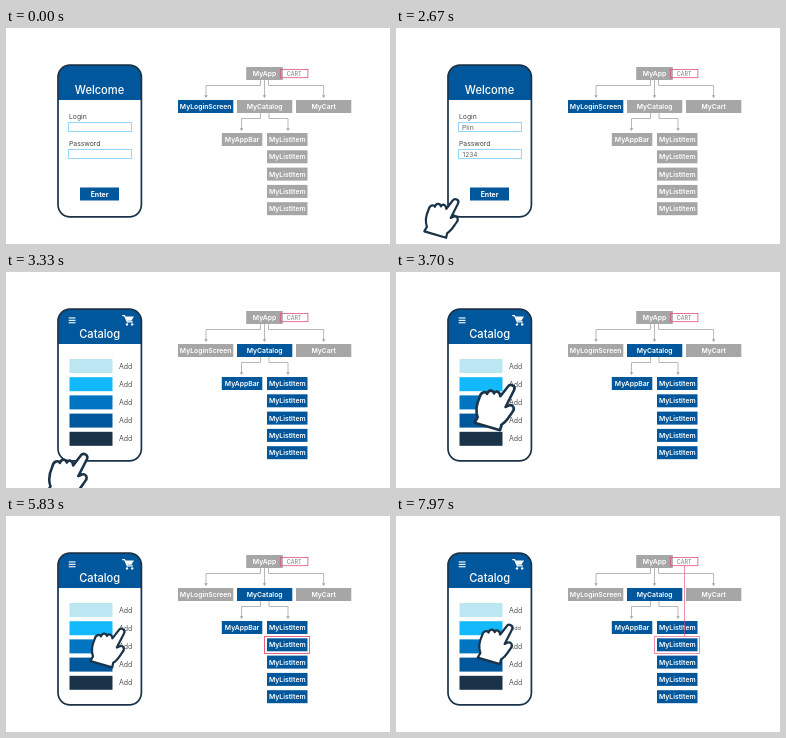
Recreate the animation shown at these times as an HTML page with a canvas. Size 384 by 216 pixels, loop 8 s.

```html
<!DOCTYPE html>
<html lang="en">
<head>
<meta charset="utf-8">
<style>
  html, body { margin: 0; width: 100%; height: 100%; overflow: hidden; background: #fff; }
  canvas { display: block; width: 384px; height: 216px; }
</style>
</head>
<body>
<canvas id="stage"></canvas>
<script>
const LOOP = 8000;
const BLUE = '#01579b', NAVY = '#1a3349', GRAY = '#a6a6a6', RED = '#e0527a', SKY = '#95d8f6';
const SWATCHES = ['#bbe6f2', '#13b9fd', '#0175c2', BLUE, NAVY];
const HAND = new Path2D(
  'M28.6 2.4C30.8 -1.2 36 1.6 34 5.4L26.8 19.6L29.8 18.2C33.4 17.2 35.2 21 32.6 24' +
  'C30 27.4 28 32 23.2 34.8L22.2 39.4L.4 33L3 28.4C1 23 1.6 18 4.6 11.4' +
  'C5.6 6.6 9.6 5.8 11 8.4C12 4.8 16 4.6 17 8C18.4 5.2 22 6 22.4 10.4Z');

const canvas = document.getElementById('stage');
const ctx = canvas.getContext('2d');
const ratio = window.devicePixelRatio || 1;
canvas.width = 384 * ratio;
canvas.height = 216 * ratio;

const ramp = (t, from, to) => Math.min(1, Math.max(0, (t - from) / (to - from)));
const mix = (a, b, p) => a + (b - a) * p;
const easeOut = p => 1 - (1 - p) ** 3;
const easeInOut = p => p < .5 ? 4 * p ** 3 : 1 - 4 * (1 - p) ** 3;
const pulse = (t, from, to) => Math.sin(Math.PI * ramp(t, from, to));

function box(x, y, w, h, color) {
  ctx.fillStyle = color;
  ctx.fillRect(x, y, w, h);
}

function frame(x, y, w, h, color, width = 1) {
  ctx.strokeStyle = color;
  ctx.lineWidth = width;
  ctx.strokeRect(x, y, w, h);
}

function line(points, color, width) {
  ctx.beginPath();
  points.forEach(([x, y]) => ctx.lineTo(x, y));
  ctx.strokeStyle = color;
  ctx.lineWidth = width;
  ctx.stroke();
}

function text(label, x, y, size, color, align = 'left', weight = 400) {
  ctx.font = `${weight} ${size}px Inter, sans-serif`;
  ctx.textAlign = align;
  ctx.fillStyle = color;
  ctx.fillText(label, x, y);
}

function loginPage(t) {
  const typed = t < 930 ? 0 : Math.floor((t - 930) / 71.4) + 1;
  text('Welcome', 93.5, 66, 11.1, '#fff', 'center', 500);
  text('Login', 63, 90.5, 6.8, '#444');
  frame(62.5, 94.5, 63, 9, SKY);
  text('Plin'.slice(0, typed), 66, 101.6, 6.8, '#666');
  text('Password', 63, 117.6, 6.8, '#444');
  frame(62.5, 121.5, 63, 9, SKY);
  text('1234'.slice(0, Math.max(0, typed - 4)), 66.5, 128.5, 6.6, '#666');
  box(74, 159.5, 39, 13, BLUE);
  text('Enter', 93.6, 168.5, 6.9, '#fff', 'center', 700);
}

function shoppingCart() {
  line([[116.3, 43.6], [118.5, 43.6], [121.3, 49.8], [126.8, 49.8]], '#fff', 1.2);
  ctx.beginPath();
  [[119.1, 44.6], [128, 44.6], [125.4, 48.8], [121.1, 48.8]].forEach(p => ctx.lineTo(...p));
  ctx.fillStyle = '#fff';
  ctx.fill();
  for (const x of [121, 126.2]) {
    ctx.beginPath();
    ctx.arc(x, 52.4, 1.2, 0, 7);
    ctx.fill();
  }
}

function catalogPage(t) {
  for (let i = 0; i < 3; i++) box(62.7, 45.4 + i * 2.4, 6.8, 1.1, '#fff');
  shoppingCart();
  text('Catalog', 93.7, 66, 11.1, '#fff', 'center', 500);
  const pressed = pulse(t, 3880, 4120) + ramp(t, 7900, 7970);
  SWATCHES.forEach((color, i) => {
    const y = 87 + i * 18.2;
    box(63.5, y, 43, 14, color);
    scaled(119.7, y + 7, i === 1 ? 1 - .22 * pressed : 1,
      () => text('Add', 119.7, y + 9.5, 7, '#555', 'center'));
  });
}

function scaled(x, y, scale, draw) {
  ctx.save();
  ctx.translate(x, y);
  ctx.scale(scale, scale);
  ctx.translate(-x, -y);
  draw();
  ctx.restore();
}

function phone(t) {
  const slide = 90 * easeInOut(ramp(t, 3020, 3305));
  const body = new Path2D();
  body.roundRect(52, 37.2, 83.4, 151.6, 12);
  ctx.save();
  ctx.clip(body);
  box(52, 37, 84, 35, BLUE);
  ctx.translate(-slide, 0);
  if (slide < 90) loginPage(t);
  ctx.translate(90, 0);
  if (slide > 0) catalogPage(t);
  ctx.restore();
  ctx.strokeStyle = NAVY;
  ctx.lineWidth = 1.7;
  ctx.stroke(body);
}

function arrow(points) {
  line(points, GRAY, .8);
  const [x, y] = points[points.length - 1];
  ctx.beginPath();
  ctx.moveTo(x - 1.8, y - 1.8);
  ctx.lineTo(x + 1.8, y - 1.8);
  ctx.lineTo(x, y + 1);
  ctx.fillStyle = GRAY;
  ctx.fill();
}

function node(label, x, y, w, color) {
  box(x, y, w, 13, color);
  text(label, x + w / 2, y + 9, 6.8, '#fff', 'center', 600);
}

function tree(t) {
  const onCatalog = t >= 3300;
  const catalogColor = onCatalog ? BLUE : GRAY;
  arrow([[254.5, 52], [254.5, 57.5], [200, 57.5], [200, 69]]);
  arrow([[258.5, 52], [258.5, 69]]);
  arrow([[262.5, 52], [262.5, 57.5], [317.6, 57.5], [317.6, 69]]);
  arrow([[254.5, 85], [254.5, 90.5], [235.5, 90.5], [235.5, 102]]);
  arrow([[263, 85], [263, 90.5], [282, 90.5], [282, 102]]);
  node('MyApp', 240.2, 39, 36.6, GRAY);
  node('MyLoginScreen', 172, 72, 55.3, onCatalog ? GRAY : BLUE);
  node('MyCatalog', 231, 72, 55.3, catalogColor);
  node('MyCart', 290, 72, 55.3, GRAY);
  node('MyAppBar', 215.8, 105, 40.5, catalogColor);
  for (let i = 0; i < 5; i++) node('MyListItem', 261, 105 + i * 17.3, 40.5, catalogColor);
}

function cartState(t) {
  const fade = 1 - .3 * ramp(t, 7900, 7970);
  ctx.globalAlpha = fade * ramp(t, 3950, 4150);
  scaled(281, 129, 1 + .16 * pulse(t, 6550, 7000), () => frame(258.5, 120.5, 45, 17, RED, .9));

  ctx.globalAlpha = fade;
  const up = easeInOut(ramp(t, 4150, 4700));
  const retract = easeInOut(ramp(t, 5450, 5640));
  const down = easeInOut(ramp(t, 5970, 6600));
  if (up > retract) line([[288.5, mix(120, 50, up)], [288.5, mix(120, 50, retract)]], RED, .9);
  if (down > 0) line([[288.5, 50], [288.5, mix(50, 120, down)]], RED, .9);

  ctx.globalAlpha = 1;
  scaled(288.5, 45.5, 1 + .38 * pulse(t, 4700, 5450), () => {
    frame(274.3, 41.4, 27.6, 8.3, RED, .8);
    text('CART', 288.2, 47.6, 5.5, '#777', 'center');
  });
}

// x, y is the fingertip, which stays in place while the hand changes size.
function hand(x, y, scale) {
  ctx.save();
  ctx.translate(x, y);
  ctx.scale(scale, scale);
  ctx.translate(-34, 0);
  ctx.fillStyle = '#fff';
  ctx.fill(HAND);
  ctx.strokeStyle = NAVY;
  ctx.lineWidth = 2.2;
  ctx.lineJoin = 'round';
  ctx.stroke(HAND);
  ctx.restore();
}

function pointer(t) {
  if (t >= 1770 && t < 2880) {
    const enter = easeOut(ramp(t, 1770, 2420));
    const leave = ramp(t, 2580, 2870);
    hand(mix(-2, 93, enter) - 99 * leave, mix(186, 166, enter) + 14 * leave,
      mix(1.32, 1.17, enter) - .17 * ramp(t, 2430, 2570));
  } else if (t >= 3270) {
    const enter = easeOut(ramp(t, 3270, 3750));
    const again = ramp(t, 7900, 7970);
    hand(mix(62, 118, enter) - 2 * again, mix(216, 112, enter) - 4 * again,
      1.17 - .17 * ramp(t, 3850, 4000) + .02 * again);
  }
}

function render() {
  const t = performance.now() % LOOP;
  ctx.setTransform(ratio, 0, 0, ratio, 0, 0);
  box(0, 0, 384, 216, '#fff');
  phone(t);
  tree(t);
  cartState(t);
  pointer(t);
  requestAnimationFrame(render);
}
render();
</script>
</body>
</html>
```
